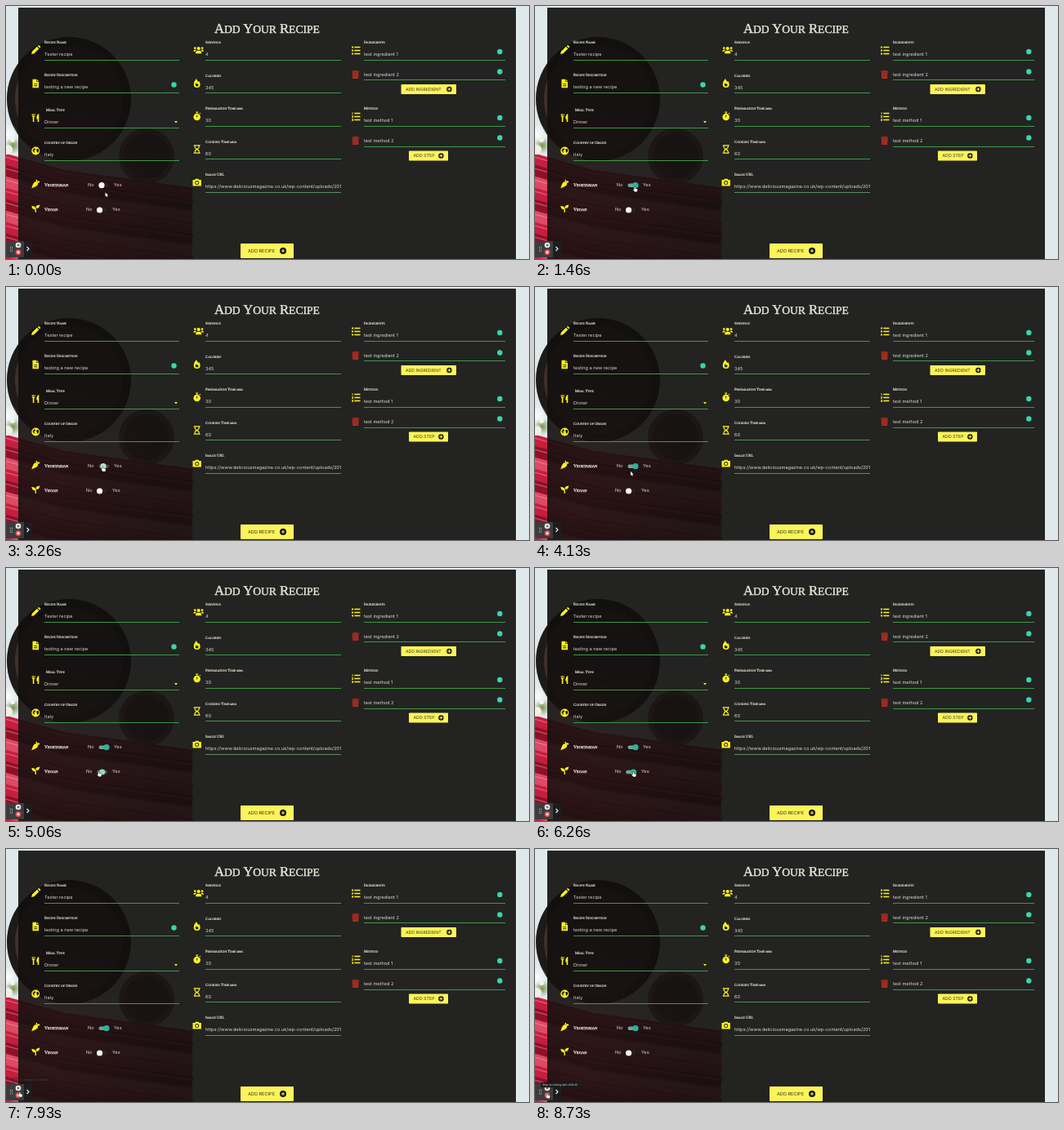
An HTML page with a canvas for the animation above (8800 ms loop, 640 by 310 pixels).

```html
<!DOCTYPE html>
<html lang="en">
<head>
<meta charset="utf-8">
<title>Add Your Recipe</title>
<style>
html, body { margin: 0; width: 100%; height: 100%; overflow: hidden; background: #222; }
canvas { display: block; width: 640px; height: 310px; }
</style>
</head>
<body>
<canvas id="stage"></canvas>
<script>
const W = 640, H = 310, LOOP = 8800;
const YELLOW = '#fdf21c', BUTTON = '#fcf45a', GREEN = '#3f9844', CREAM = '#ebe7d8', MINT = '#38d6a8', RED = '#b82c1e';
const SANS = 'Inter, "Open Sans", sans-serif';
const SERIF = '"Liberation Serif", "Noto Serif", serif';

const stage = document.getElementById('stage');
const back = document.createElement('canvas');
const scale = window.devicePixelRatio || 1;
for (const c of [stage, back]) {
  c.width = W * scale;
  c.height = H * scale;
}
const view = stage.getContext('2d');
let g = back.getContext('2d');
for (const c of [g, view]) {
  c.scale(scale, scale);
  c.textRendering = 'geometricPrecision';
}

function rect(x, y, w, h, color) {
  g.fillStyle = color;
  g.fillRect(x, y, w, h);
}

function disc(x, y, r, color) {
  g.fillStyle = color;
  g.beginPath();
  g.arc(x, y, r, 0, Math.PI * 2);
  g.fill();
}

function pill(x, y, w, h, r, color) {
  g.fillStyle = color;
  g.beginPath();
  g.roundRect(x, y, w, h, r);
  g.fill();
}

function glow(x, y, r, rgb, alpha) {
  const shade = g.createRadialGradient(x, y, 0, x, y, r);
  shade.addColorStop(0, `rgba(${rgb},${alpha})`);
  shade.addColorStop(1, `rgba(${rgb},0)`);
  rect(x - r, y - r, r * 2, r * 2, shade);
}

function stroke(color, width, ...points) {
  g.strokeStyle = color;
  g.lineWidth = width;
  g.beginPath();
  points.forEach(([x, y]) => g.lineTo(x, y));
  g.stroke();
}

function text(str, x, y, size = 5.6, color = '#d9d9d4') {
  g.font = `${size}px ${SANS}`;
  g.fillStyle = color;
  g.fillText(str, x, y);
}

// Capitals at full size, lower case as smaller capitals; returns the end
function smallCaps(str, x, y, size, heavy = 0.15) {
  g.fillStyle = g.strokeStyle = CREAM;
  g.lineWidth = heavy;
  for (const run of str.match(/[a-z]+|[^a-z]+/g)) {
    const px = /[a-z]/.test(run) ? size * 0.82 : size;
    const caps = run.toUpperCase();
    g.font = `${px}px ${SERIF}`;
    g.fillText(caps, x, y);
    g.strokeText(caps, x, y);
    x += g.measureText(caps).width;
  }
  return x;
}

const ring = (x, y, r) => `M${x - r} ${y}a${r} ${r} 0 1 0 ${2 * r} 0a${r} ${r} 0 1 0 ${-2 * r} 0z`;
const bars = [-4, 0, 4].map(y => `M-2 ${y - 0.7}H5.2V${y + 0.7}H-2z`).join('');
const icons = {
  pencil: 'M-5.2 5l.8-3.3 6-6 2.5 2.5-6 6zM2.4-5l1-.8q.6-.4 1 0l1.4 1.4q.4.5 0 1l-.9 1z',
  file: 'M-3.8-5.2H1V-2H3.8V5.2H-3.8zM1.6-5.2 3.8-2.7H1.6zM-2 .2H2V1.1H-2zM-2 2.3H2V3.2H-2z',
  utensils: 'M-4.5-5h.8v3h.7v-3h.8v3h.7v-3h.8q.5 3.5-1.2 4.5V5h-1.6V-.5q-1.6-1-1-4.5zM4-5V5H2.3V1.5H1Q.8-4 4-5z',
  globe: ring(0, 0, 5) + 'M-3.7-.8l2-2.4 1.8.6-1 1.7-1 .4.5 1.7-.8 1.3zM1-2.3l2.4-.2.6 2.5-1.5 2.4-1.2-1.8z',
  carrot: 'M-5 5.2Q-2.6-3.2 0-2.8Q3.2-2.4 2.9.2Q2.6 2.6-5 5.2zM.5-3.2Q-.4-4.8 1-5.6Q2.1-4.6 1.9-3.2Q3.6-4.3 5.2-2.6Q4.4-1.2 2.8-1.4z',
  seedling: 'M-5-3Q0-3 .6 1V5H-.7V1.5Q-4.6 1-5-3zM5-4.5Q4.8-.3 1.2.1Q.8-1.3 0-2.1Q1.3-4.4 5-4.5z',
  users: ring(0, -2, 2.1) + ring(-4.4, -2.4, 1.4) + ring(4.4, -2.4, 1.4) +
    'M-3.6 4.3V3Q-3.4.8-1 .7H1Q3.4.8 3.6 3V4.3zM-6.3 1.8Q-6.3-.5-3.7-.5Q-3-.3-2.7.2Q-4 .8-4.2 1.8zM6.3 1.8Q6.3-.5 3.7-.5Q3-.3 2.7.2Q4 .8 4.2 1.8z',
  flame: 'M-.8-5.4Q0-3 2-1.6L2.7-2.6Q4 0 4 1.4A4 4 0 0 1-4 1.4Q-4-1.5-.8-5.4zM0 4a1.8 1.8 0 0 0 1-3.3L0 1.4-.6-.6Q-2 1-1.9 2.2A1.9 1.9 0 0 0 0 4z',
  timer: ring(0, 1, 4.3) + 'M-1.5-5.5H1.5V-4.4H.6V-3.2H-.6V-4.4H-1.5zM2.8-3.4l.8-.8 1 1-.8.8zM-.5-1.4H.5V1.6H-.5z',
  hourglass: 'M-4-5.2H4V-4.1H3.3Q3.3-1.2 1.2 0Q3.3 1.2 3.3 4.1H4V5.2H-4V4.1H-3.3Q-3.3 1.2-1.2 0Q-3.3-1.2-3.3-4.1H-4zM-2.2-4.1Q-2-1.6 0-.8Q2-1.6 2.2-4.1zM-2.2 4.1Q-2 1.6 0 .8Q2 1.6 2.2 4.1z',
  camera: 'M-5.2-3H-2.6L-1.8-4.3H1.8L2.6-3H5.2V4.4H-5.2z' + ring(0, 0.6, 2.5) + ring(0, 0.6, 1.6),
  list: bars + [-4, 0, 4].map(y => `M-5.2 ${y - 1}h2v2h-2z`).join(''),
  steps: bars + 'M-4.7-5.3h.9v2.6h-.9zM-5.2-1.2h2v1l-1 1h1v.7h-2v-.8l1.1-1.1h-1.1zM-5.2 2.7h2v2.6h-2v-.7h1.1v-.4h-.9v-.6h.9v-.3h-1.1z',
  trash: 'M-4.4-4.4H-1.6L-1.2-5.1H1.2L1.6-4.4H4.4V-3.3H-4.4zM-3.8-2.8H3.8L3.4 5.1H-3.4zM-1.8-1.4v5h.3v-5zM-.15-1.4v5h.3v-5zM1.5-1.4v5h.3v-5z'
};

function icon(name, x, y, color = YELLOW) {
  g.save();
  g.translate(x, y);
  g.fillStyle = color;
  g.fill(new Path2D(icons[name]), 'evenodd');
  g.restore();
}

function photo() {
  rect(0, 0, W, H, '#dfe9ec');
  disc(77, 114, 76, '#1d1a17');
  disc(77, 114, 66, '#40302a');
  disc(172, 184, 34, '#8c5a50');
  disc(172, 184, 28, '#5c3b35');
  // Stalks fanning up from the lower left
  for (let i = 0; i < 11; i++) {
    const y = 186 + i * 14;
    const tone = ['#c51f3f', '#8f1029', '#dc4a64'][i % 3];
    stroke(tone, 14.5, [-8, y], [70, y + 22], [228, y + 44]);
    stroke('rgba(255,170,180,.4)', 1.5, [-8, y - 3], [70, y + 19], [228, y + 41]);
  }
  glow(2, 157, 13, '255,255,255', 0.95);
  glow(9, 171, 10, '112,140,62', 0.9);
  disc(2, 176, 6, '#eff0e8');
  disc(8, 164, 3, '#f5f4ea');
}

function panel() {
  rect(15, 2, 609, 308, 'rgba(17,16,15,.908)');
  g.save();
  g.beginPath();
  g.rect(15, 2, 609, 308);
  g.clip();
  glow(50, 265, 150, '150,40,40', 0.1);
  g.restore();
}

function entry(value, x, right, line, color = GREEN) {
  g.save();
  g.beginPath();
  g.rect(x, line - 15, right - x, 18);
  g.clip();
  text(value, x, line - 5.7);
  g.restore();
  rect(x, Math.round(line) - 1, right - x, 1, color);
}

function field(label, value, x, right, line, { note, indent = 0, color } = {}) {
  const end = smallCaps(label, x + indent, line - 20.8, 4.7);
  if (note) smallCaps(note, end + 1, line - 20.8, 3.9);
  entry(value, x, right, line, color);
}

function button(label, x, y, w, h, size, pad, plus) {
  pill(x, y, w, h, 0.8, BUTTON);
  const mid = y + h / 2;
  text(label, x + pad, mid + size * 0.36, size, '#38371f');
  const px = x + w - pad - plus;
  disc(px, mid, plus, '#15150d');
  rect(px - 2, mid - 0.5, 4, 1, BUTTON);
  rect(px - 0.5, mid - 2, 1, 4, BUTTON);
}

function recorder() {
  pill(0, 288, 22, 20, 1, '#3c3c3e');
  pill(22, 288, 10, 20, 1, '#1d1d1f');
  for (let i = 0; i < 6; i++) rect(5 + (i % 2) * 2, 295 + (i >> 1) * 2.4, 1, 1, '#c9c9c9');
  disc(15, 293, 3.3, '#f3f3f3');
  rect(13.8, 291.6, 0.9, 2.8, '#333');
  rect(15.4, 291.6, 0.9, 2.8, '#333');
  disc(15, 301.7, 3.4, '#e2474a');
  disc(15, 301.7, 1.7, '#f6e4e2');
  stroke('#f4f4f4', 1.1, [25.5, 295], [28, 297.5], [25.5, 300]);
}

function form() {
  smallCaps('Add Your Recipe', 255, 32.5, 16.6, 0.4);

  field('Recipe Name', 'Tester recipe', 47, 212, 67);
  field('Recipe Description', 'testing a new recipe', 47, 212, 107);
  field('Meal Type', 'Dinner', 47, 212, 150, { indent: 2 });
  field('Country of Origin', 'Italy', 47, 212, 190);
  g.fillStyle = YELLOW;
  g.fill(new Path2D('M206 141h4l-2 2.4z'));

  field('Servings', '4', 244, 410, 67);
  field('Calories', '345', 244, 410, 107.4);
  field('Preparation Time', '30', 244, 410, 148, { note: 'mins' });
  field('Cooking Time', '60', 244, 410, 188.4, { note: 'mins' });
  field('Image URL', 'https://www.deliciousmagazine.co.uk/wp-content/uploads/2018/', 244, 410, 229, { color: '#5d8a5f' });

  field('Ingredients', 'test ingredient 1', 438, 611, 66.6);
  entry('test ingredient 2', 438, 611, 91.2);
  field('Method', 'test method 1', 438, 611, 148);
  entry('test method 2', 438, 611, 172.6);

  smallCaps('Vegetarian', 47, 221, 5.5, 0.25);
  smallCaps('Vegan', 47, 251, 5.5, 0.25);
  text('No', 100, 221.3);
  text('Yes', 132, 221.3);
  text('No', 98, 251.3);
  text('Yes', 130, 251.3);

  ['pencil', 'file', 'utensils', 'globe', 'carrot', 'seedling']
    .forEach((name, i) => icon(name, 36.3, [54, 95, 137, 177.5, 218, 248][i]));
  ['users', 'flame', 'timer', 'hourglass', 'camera']
    .forEach((name, i) => icon(name, i ? 233.7 : 235.7, 54 + i * 40.5));
  icon('list', 428.3, 54.5);
  icon('steps', 428.3, 135.5);
  icon('trash', 427.7, 84, RED);
  icon('trash', 427.7, 165, RED);

  for (const [x, y] of [[205.5, 96.5], [604.3, 56], [604.3, 80.5], [604.3, 137], [604.3, 161.5]]) {
    disc(x, y, 3.2, MINT);
  }
  button('ADD INGREDIENT', 483.5, 96, 67.5, 12, 5.2, 5.4, 3.2);
  button('ADD STEP', 493, 177.5, 48, 12, 5.3, 5.4, 3.2);
  button('ADD RECIPE', 287, 291, 65, 18, 5.6, 9, 4);
  recorder();
}

const clamp = v => Math.min(1, Math.max(0, v));
const ease = v => v * v * (3 - 2 * v);
const mix = (a, b, k) => a + (b - a) * k;

// How far a switch is on, given alternating on and off click times
function level(t, clicks) {
  return clicks.reduce((v, at, i) => mix(v, i % 2 ? 0 : 1, ease(clamp((t - at) / 260))), 0);
}

function toggle(x, y, on) {
  pill(x - 3.5, y - 2.3, 12.5, 4.6, 2.3, `rgba(132,199,190,${0.06 + 0.74 * on})`);
  const [r, gr, b] = [mix(250, 42, on), mix(252, 178, on), mix(240, 154, on)];
  disc(x + on * 6, y, 3.6, `rgb(${r},${gr},${b})`);
}

const path = [
  [0, 121.5, 228.5], [500, 121.5, 228.5], [950, 121.5, 221.5], [2000, 121.5, 221.5],
  [2700, 118, 220], [3900, 118, 220], [4700, 113, 249.5], [5200, 113, 249.5],
  [5800, 119.8, 249.8], [7000, 119.8, 249.8], [7800, 16.5, 297.5], [8300, 14.5, 299.5], [LOOP, 14.5, 299.5]
];

function pointer(t) {
  const i = path.findIndex(p => p[0] > t);
  const [a, b] = [path[i - 1], path[i]];
  const k = ease((t - a[0]) / (b[0] - a[0]));
  return [mix(a[1], b[1], k), mix(a[2], b[2], k)];
}

const arrow = new Path2D('M0 0V5L1.2 4 2 5.8 2.9 5.4 2.1 3.6H3.7z');
const hand = new Path2D('M0 .4Q.6-.4 1.2.4V2.2L3.6 2.8Q4 3 3.9 3.7L3.4 6H.4L-1.4 3.6Q-1.2 2.8-.4 3.2L0 3.5z');

function cursor(t) {
  const [x, y] = pointer(t);
  const onSwitch = x > 108 && x < 128 && (y < 225 || y > 245);
  const shape = onSwitch || y > 288 ? hand : arrow;
  g.save();
  g.translate(x, y);
  g.lineWidth = 0.9;
  g.strokeStyle = '#111';
  g.fillStyle = '#fff';
  g.stroke(shape);
  g.fill(shape);
  g.restore();
}

function tooltip(t) {
  const k = clamp((t - 7860) / 300);
  if (!k) return;
  g.save();
  g.globalAlpha = k;
  const y = mix(282, 289, ease(k));
  pill(7, y - 3.2, 47, 6.4, 1, '#1b1b1c');
  text('Stop recording (alt+shift+D)', 9, y + 1.2, 3.3, '#e4e4e4');
  g.restore();
}

photo();
panel();
form();
g = view;

function frame(now) {
  const t = now % LOOP;
  g.drawImage(back, 0, 0, W, H);
  toggle(117, 219.7, level(t, [1130, 2200, 3160]));
  toggle(114.6, 250, level(t, [4930, 6800]));
  tooltip(t);
  cursor(t);
  requestAnimationFrame(() => frame(performance.now() - start));
}

const start = performance.now();
frame(0);
</script>
</body>
</html>
```
